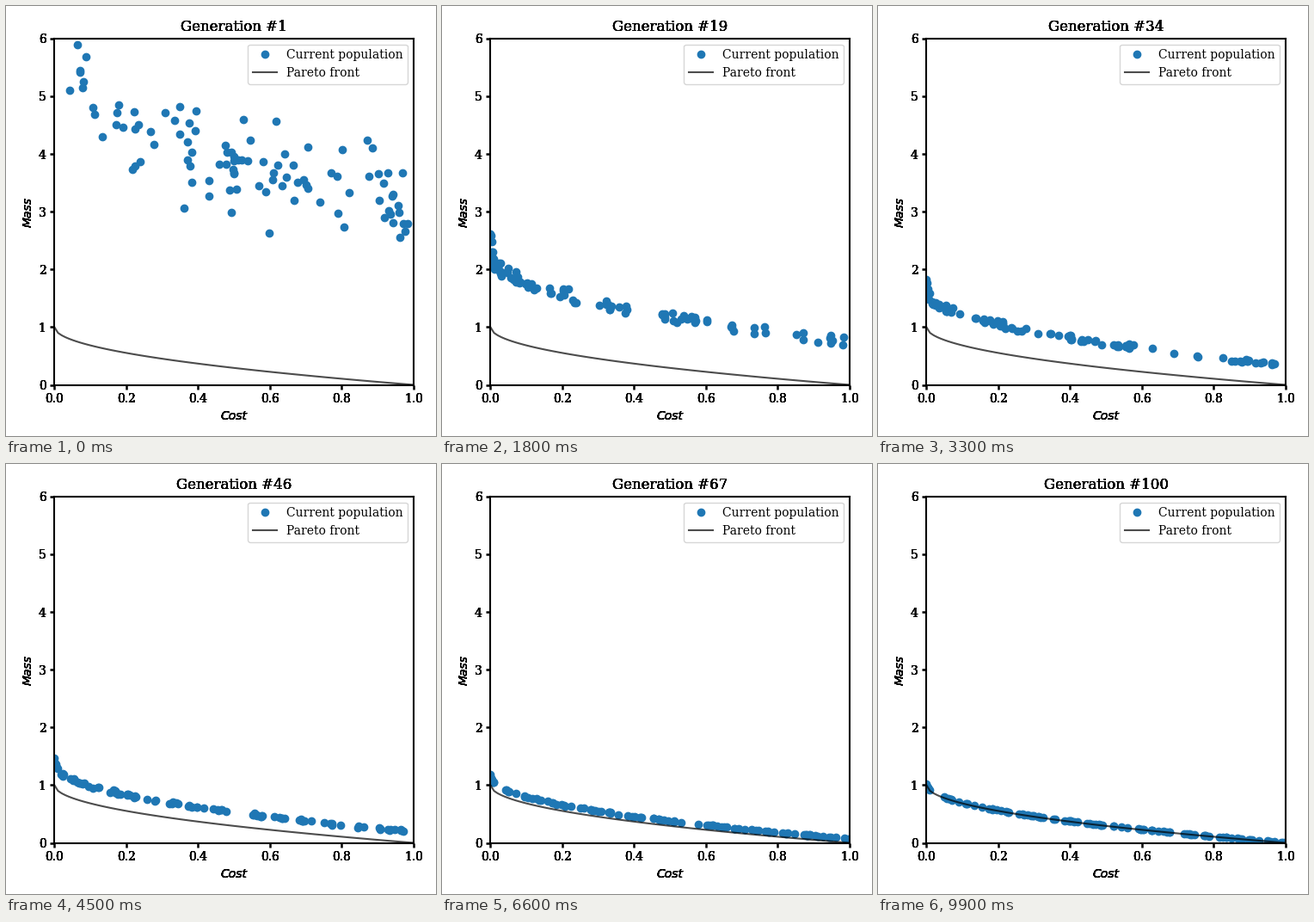
Recreate the animation shown at these times as a matplotlib script. Size 500 by 500 pixels, loop 10000 ms.

```python
import matplotlib.pyplot as plt
import numpy as np
from matplotlib.animation import FuncAnimation

SIDE, DPI = 500, 100
GENERATIONS, SIZE = 100, 100
VARIABLES = 29  # decision variables behind g in the ZDT1 problem
EDGE = 6        # individuals kept at the zero-cost end
OVERDRAW = 6    # extra passes that give the labels their heavy look


def excess(gen):
    """Distance of the best individuals from the optimum g = 1."""
    level = np.log([3.5, 1.13, .122, .055, .011])
    return np.exp(np.interp(gen, [1, 19, 67, 81, 100], level))


def mass(cost, g):
    return g - np.sqrt(g * cost)


def evolve(seed):
    """Front of every generation: weak members give way to better ones,
    mostly bred next to a neighbour and sometimes placed afresh."""
    rng = np.random.default_rng(seed)
    rank = np.arange(SIZE)
    lift = np.ones(SIZE)
    lift[:EDGE] = np.linspace(1.3, 1.05, EDGE)

    cost = np.sort(rng.random(SIZE))
    g = 1 + 9 * rng.random((SIZE, VARIABLES)).mean(axis=1)
    history = [(cost, mass(cost, g))]
    for gen in range(2, GENERATIONS + 1):
        base = excess(gen) * lift
        renew = (g > 1 + base * (1.2 + .6 / gen)) | (rng.random(SIZE) < .33)

        # Early fronts crowd towards zero cost, later ones are even.
        power = 1.1 + 1.3 * np.exp(-(gen / 34) ** 2)
        placed = ((rank + rng.random(SIZE)) / SIZE) ** power
        parent = np.clip(rank + rng.integers(-3, 4, SIZE), 0, SIZE - 1)
        bred = np.abs(cost[parent] + rng.normal(0, .004, SIZE))
        afresh = rng.random(SIZE) < .15 + .35 * gen / GENERATIONS
        child = np.clip(np.where(afresh, placed, bred), 0, 1)
        child[:EDGE] = np.linspace(0, .008, EDGE)

        noise = 1 + .07 * np.abs(rng.normal(size=SIZE))
        cost = np.where(renew, child, cost)
        g = np.where(renew, 1 + base * noise, g)
        history.append((cost, mass(cost, g)))
    return history


def overdraw(label):
    copies = []
    for _ in range(OVERDRAW):
        text = fig.text(0, 0, label.get_text())
        text.update_from(label)
        text.set_position(label.get_position())
        text.set_rotation_mode(label.get_rotation_mode())
        copies.append(text)
    return copies


plt.rcParams["font.family"] = "DejaVu Serif"
fig, ax = plt.subplots(figsize=(SIDE / DPI, SIDE / DPI), dpi=DPI)
fig.subplots_adjust(left=.1126, right=.948, bottom=.119, top=.9245)

dots, = ax.plot([], [], "o", color="tab:blue", label="Current population")
front = np.linspace(0, 1, 100)
ax.plot(front, mass(front, 1), color="black", alpha=.7, label="Pareto front")
ax.set(xlim=(0, 1), ylim=(0, 6), title="Generation #1")
ax.set_xlabel("Cost", family="DejaVu Sans", style="italic")
ax.set_ylabel("Mass", family="DejaVu Sans", style="italic")
ax.legend(loc="upper right")
ax.tick_params(width=1.8)
for spine in ax.spines.values():
    spine.set_linewidth(1.5)

fig.canvas.draw()  # settles label positions before they are copied
for label in [*ax.get_xticklabels(), *ax.get_yticklabels(),
              ax.xaxis.label, ax.yaxis.label]:
    overdraw(label)
titles = [ax.title, *overdraw(ax.title)]
history = evolve(seed=4)


def update(frame):
    dots.set_data(*history[frame])
    for title in titles:
        title.set_text(f"Generation #{frame + 1}")
    return [dots, *titles]


anim = FuncAnimation(fig, update, frames=GENERATIONS, interval=100,
                     repeat=True, repeat_delay=0)
plt.show()
```
